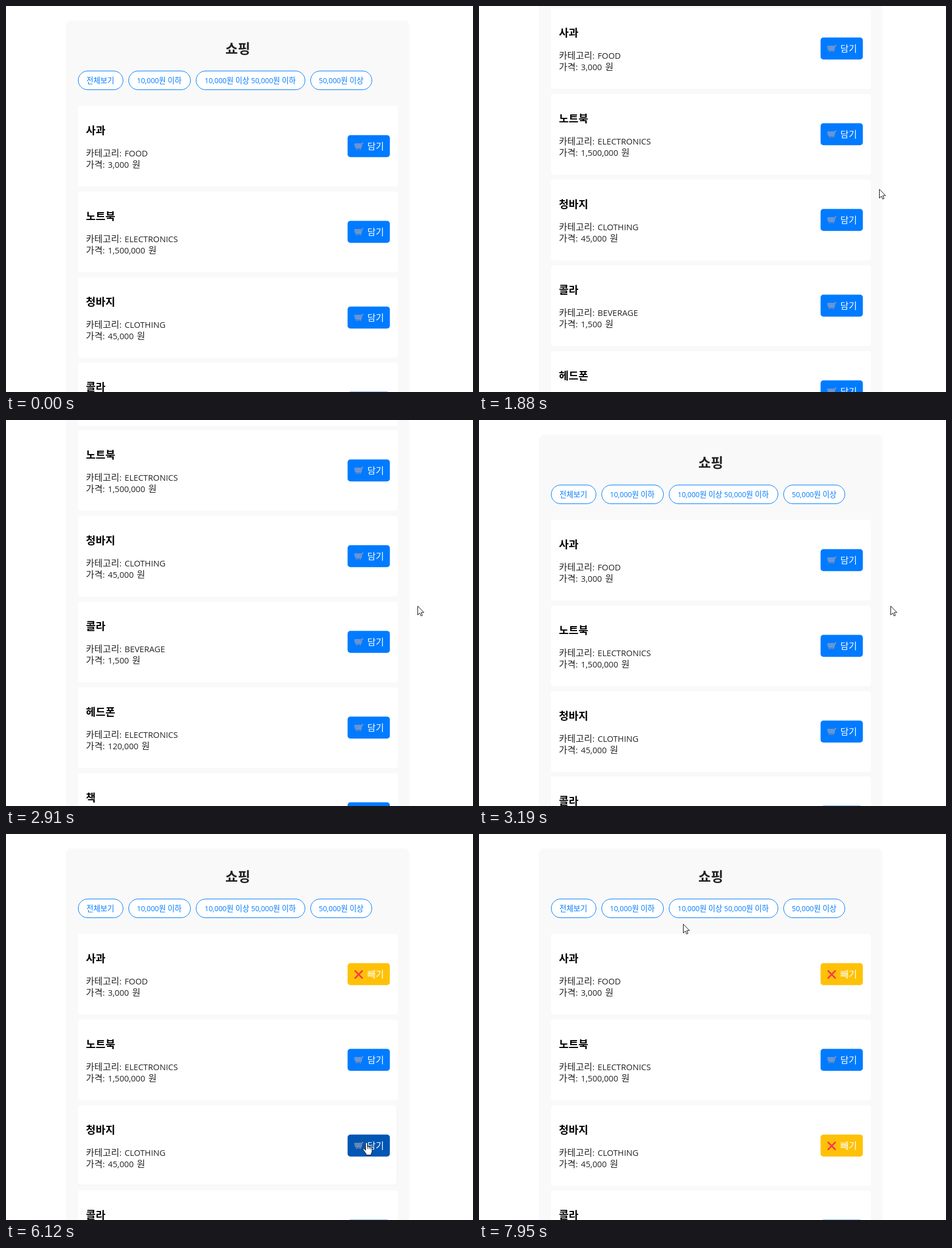
An HTML page that plays this animation: 824 by 680 pixels, repeating every 8 s.

```html
<!DOCTYPE html>
<html lang="ko">
<head>
<meta charset="utf-8">
<title>쇼핑</title>
<style>
  html, body { margin: 0; width: 100%; height: 100%; overflow: hidden; background: #fff; }
  svg { display: block; }
  text { font-family: 'Noto Sans CJK KR', 'Noto Sans CJK', sans-serif; white-space: pre; }
  tspan { font-family: 'Open Sans', sans-serif; }
  .detail tspan { word-spacing: 1.7px; }
</style>
</head>
<body>
<svg id="stage" width="824" height="680" viewBox="0 0 824 680">
  <defs>
    <g id="cart" fill="none" stroke-linecap="round" opacity=".9">
      <path d="M.9 2.8H13.4L12 9.4H2.5Z" stroke="#a9a5bb" fill="#a9a5bb" fill-opacity=".3"/>
      <path d="M1.4 5H12.8M2 7.2H12.4M4.2 3 4.8 9.4M7 3V9.4M9.8 3 9.4 9.4" stroke="#a9a5bb" stroke-width=".8"/>
      <path d="M15.3 1.4H14.2L11.6 11.4H3" stroke="#9c93ab"/>
      <path d="M14 1.5H15.4" stroke="#d98a92" stroke-width="1.3"/>
      <path d="M3.8 12.8h.1M11 12.8h.1" stroke="#85809a" stroke-width="1.5"/>
    </g>
    <path id="cross" d="M1.6 1.3 14 13.7M14 1.3 1.6 13.7" stroke="#fb3550" stroke-width="2.7" stroke-linecap="round"/>
    <path id="arrow" d="M.5 .8V16.4L4.1 13 6.3 18.2 8.7 17.2 6.5 12.1H11.4Z" fill="#fff" stroke="#111" stroke-linejoin="round"/>
    <g id="hand" stroke="#111" stroke-linejoin="round" stroke-linecap="round">
      <path d="M-.7 2.4C-.7 .2 2.9 .2 2.9 2.4V8C3.3 6.9 5.9 7 6 8.7 6.6 7.7 8.5 8 8.6 9.6 9.3 8.9 11 9.3 11 11V15.5C11 18 9.6 19 9.2 20.4V22.6H.6V20.8C-1 18.6-3.2 15.8-4.7 13.4-5.7 11.6-3.6 10.6-2.3 12L-.7 14Z" fill="#fff"/>
      <path d="M2.9 8V11.5M6 8.9V11.7M8.6 9.8V12" stroke-width=".9"/>
    </g>
  </defs>
  <g id="page"></g>
  <circle id="tap" r="11" fill="#ffe600" opacity=".62"/>
  <use id="cursor"/>
</svg>
<script>
const $ = id => document.getElementById(id);
const LOOP = 8000, TOP = 176, PITCH = 150.8;
const BLUE = '#007bff', NAVY = '#0056b3', AMBER = '#ffc107', OCHRE = '#e0a800';

const items = [
  ['사과', 'FOOD', '3,000'],
  ['노트북', 'ELECTRONICS', '1,500,000'],
  ['청바지', 'CLOTHING', '45,000'],
  ['콜라', 'BEVERAGE', '1,500'],
  ['헤드폰', 'ELECTRONICS', '120,000'],
  ['책', 'CLOTHING', '25,000'],
  ['치킨', 'FOOD', '20,000']
];
const filters = [
  [127, 80, 142, '전체보기'],
  [216, 110, 231, '10,000원 이하'],
  [335, 193, 350.5, '10,000원 이상 50,000원 이하'],
  [537, 109, 552, '50,000원 이상']
];
// Bursts of activity: [first change, last change]
const bursts = [
  [1120, 2020], [2650, 3190], [3460, 4020], [5340, 5480],
  [5700, 6460], [6720, 7000], [7460, 7950]
];
const path = [
  [1050, 808, 274], [1600, 696, 320], [1690, 696, 320], [2020, 725, 326],
  [2660, 725, 326], [2800, 726, 327], [3390, 726, 327], [4020, 646, 248],
  [5630, 646, 248], [5860, 665, 390], [6120, 635, 543], [6250, 639, 555],
  [6650, 639, 555], [7000, 645, 399], [7390, 645, 399], [7950, 360, 158]
];
const scrolling = [[1690, 0], [2020, 500], [2580, 500], [2650, 464.6], [3190, 0]];
// Clicks: [row, press, added]
const clicks = [[0, 5340, 5480], [2, 6260, 6400]];

function text(x, y, size, fill, str, extra = '', latin = 0.9375) {
  const runs = str.replace(/[ -~]+/g, s => `<tspan font-size="${size * latin}">${s}</tspan>`);
  return `<text x="${x}" y="${y}" font-size="${size}" fill="${fill}" ${extra}>${runs}</text>`;
}

const detail = (y, str) => text(141, y, 16, '#222', str, 'class="detail"', 0.915);

function box(x, y, w, h, r, fill, extra = '') {
  return `<rect x="${x}" y="${y}" width="${w}" height="${h}" rx="${r}" fill="${fill}" ${extra}/>`;
}

function row([name, kind, price]) {
  return '<g class="row">' +
    box(127, 0, 564.5, 142, 5, '#fff', 'class="card"') +
    box(127, 0, 562.5, 140, 5, '#fff') +
    text(141, 50, 18.72, '#000', name, 'font-weight="700"') +
    detail(89, '카테고리: ' + kind) +
    detail(109, `가격: ${price} 원`) +
    box(602.7, 51.6, 74.6, 38.7, 5, BLUE, 'class="button"') +
    '<use class="icon" transform="translate(614.5 64)"/>' +
    '<text class="label" x="637.5" y="77.2" font-size="16" fill="#fff"></text></g>';
}

$('page').innerHTML =
  box(105.5, 25.5, 606.5, 1300, 10, '#f9f9f9', 'stroke="#fcfcfc"') +
  text(409, 83.5, 24, '#222', '쇼핑', 'font-weight="700" text-anchor="middle"') +
  filters.map(([x, w, tx, s]) =>
    box(x + 0.5, 114.5, w - 1, 33, 16.5, '#fff', `stroke="${BLUE}"`) +
    text(tx, 136, 13.333, BLUE, s)).join('') +
  items.map(row).join('');

const rows = [...document.querySelectorAll('.row')].map(g => ({
  g,
  card: g.querySelector('.card'),
  button: g.querySelector('.button'),
  icon: g.querySelector('.icon'),
  label: g.querySelector('.label')
}));

function snap(t) {
  const b = bursts.filter(([from]) => from <= t).pop();
  if (!b) return t;
  const [from, to] = b;
  return t >= to ? to : from + Math.floor((t - from) / 70) * 70;
}

function along(keys, t) {
  const n = keys.findIndex(k => k[0] > t);
  if (n === 0) return keys[0].slice(1);
  if (n < 0) return keys[keys.length - 1].slice(1);
  const a = keys[n - 1], b = keys[n];
  const p = (t - a[0]) / (b[0] - a[0]), e = p * p * (3 - 2 * p);
  return a.slice(1).map((v, i) => v + (b[i + 1] - v) * e);
}

function draw(time) {
  const t = snap(time);
  const [cx, cy] = along(path, t).map(Math.round);
  const [scroll] = along(scrolling, t);
  const shown = time >= 920;
  let pointing = false;

  $('page').setAttribute('transform', `translate(0 ${-Math.round(scroll)})`);
  rows.forEach((r, i) => {
    const y = Math.round(TOP + i * PITCH - scroll);
    const dx = cx - 603, dy = cy - y;
    const over = shown && cx >= 127 && cx < 690 && dy >= 0 && dy < 140;
    const onButton = over && dx >= 0 && dx < 74 && dy >= 52 && dy < 90;
    const added = clicks.some(([n, , at]) => n === i && t >= at);
    pointing = pointing || onButton;
    r.g.setAttribute('transform', `translate(0 ${y + Math.round(scroll)})`);
    r.card.setAttribute('fill', over ? '#f1f1f1' : '#fff');
    r.card.setAttribute('width', over ? 563.5 : 564.5);
    r.card.setAttribute('height', over ? 141 : 142);
    r.button.setAttribute('fill', added ? (onButton ? OCHRE : AMBER) : (onButton ? NAVY : BLUE));
    r.icon.setAttribute('href', added ? '#cross' : '#cart');
    r.label.textContent = added ? '빼기' : '담기';
  });

  const pressed = clicks.some(([, from, to]) => t >= from && t < to);
  $('tap').setAttribute('visibility', pressed ? 'visible' : 'hidden');
  $('tap').setAttribute('cx', cx);
  $('tap').setAttribute('cy', cy);
  $('cursor').setAttribute('visibility', shown ? 'visible' : 'hidden');
  $('cursor').setAttribute('href', pointing ? '#hand' : '#arrow');
  $('cursor').setAttribute('transform', `translate(${cx} ${cy})`);
}

const start = performance.now();
function tick() {
  draw((performance.now() - start) % LOOP);
  requestAnimationFrame(tick);
}
tick();
</script>
</body>
</html>
```
